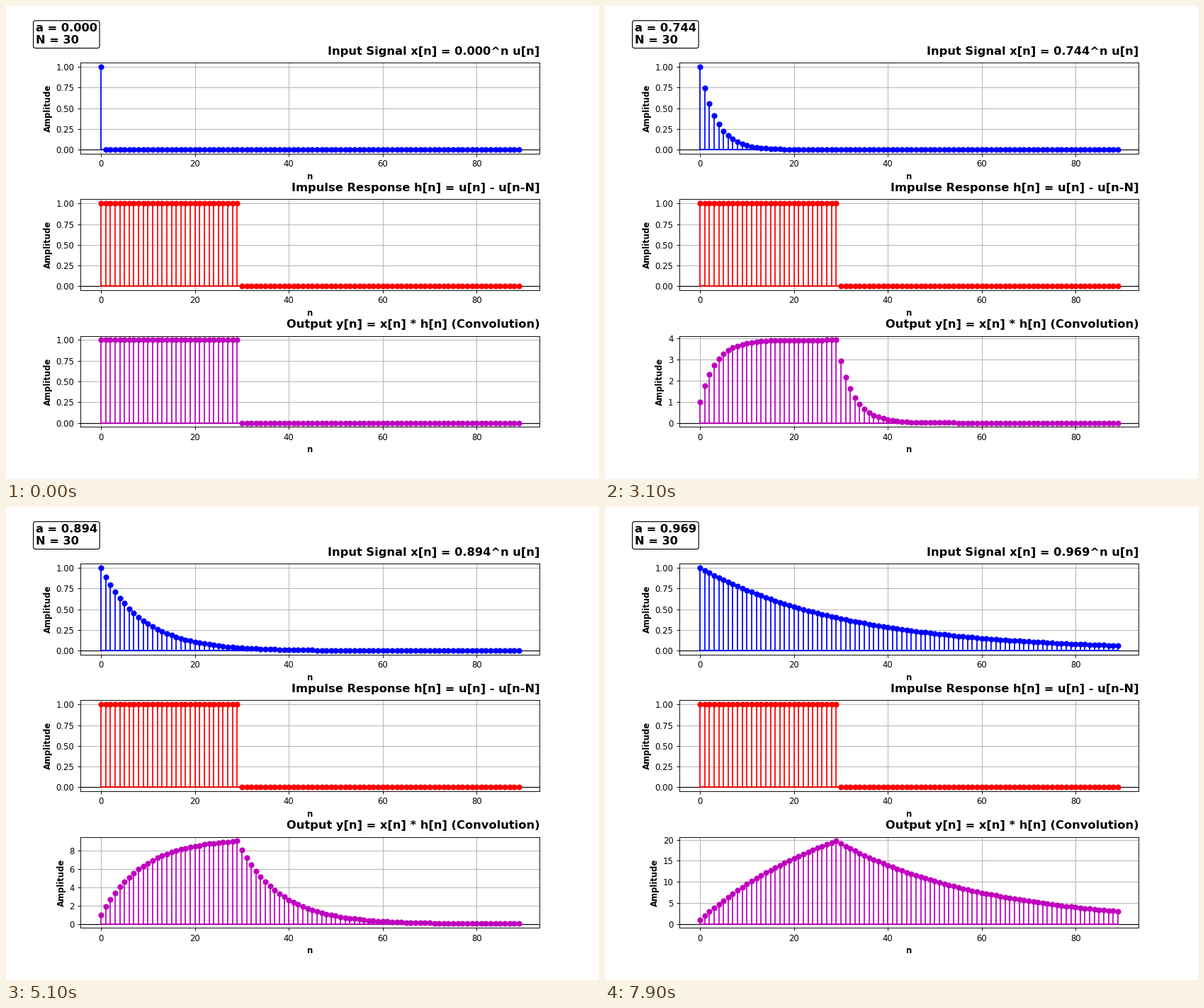
Recreate the animation shown at these times as a matplotlib script. Size 837 px wide and 669 px high, loop 8 s.

```python
import numpy as np
import matplotlib.pyplot as plt
from matplotlib.animation import FuncAnimation

DPI = 83.7
WIDTH, HEIGHT = 837, 669
FRAMES, INTERVAL = 80, 100
COUNT, N = 90, 30
DECAY = np.log(50) / (COUNT - 1)  # a reaches 0.98 after COUNT steps

n = np.arange(COUNT)
h = np.where(n < N, 1.0, 0.0)

# The small margin keeps the pixel size from rounding down.
fig, axes = plt.subplots(
    3, 1, figsize=((WIDTH + 0.01) / DPI, (HEIGHT + 0.01) / DPI), dpi=DPI)
fig.subplots_adjust(left=0.125, right=0.9, bottom=0.11, top=0.88, hspace=0.5)


def set_title(ax, text):
    ax.set_title(text, loc="right", fontsize=14, fontweight="bold", pad=10)


def make_stem(ax, color, title):
    ax.axhline(0, color="black", linewidth=1)
    stem = ax.stem(n, h, linefmt=color + "-", markerfmt=color + "o",
                   basefmt=color + "-")
    set_title(ax, title)
    ax.set_xlabel("n", fontweight="bold")
    ax.set_ylabel("Amplitude", fontweight="bold")
    ax.set_xlim(-0.05 * (COUNT - 1), 1.05 * (COUNT - 1))
    ax.set_ylim(-0.05, 1.05)
    ax.grid(True)
    return stem


def set_stem(ax, stem, values):
    stem.markerline.set_ydata(values)
    stem.stemlines.set_segments([[(x, 0), (x, y)] for x, y in zip(n, values)])
    top = values.max()
    ax.set_ylim(-0.05 * top, 1.05 * top)


ax_in, ax_imp, ax_out = axes
stem_in = make_stem(ax_in, "b", "")
make_stem(ax_imp, "r", "Impulse Response h[n] = u[n] - u[n-N]")
stem_out = make_stem(ax_out, "m", "Output y[n] = x[n] * h[n] (Convolution)")

info = fig.text(0.05, 0.94, "", fontsize=14, fontweight="bold",
                ha="left", va="center",
                bbox=dict(boxstyle="round,pad=0.2", facecolor="white",
                          edgecolor="black"))


def update(i):
    a = 1 - np.exp(-DECAY * i)
    x = a ** n
    set_stem(ax_in, stem_in, x)
    set_stem(ax_out, stem_out, np.convolve(x, h)[:COUNT])
    set_title(ax_in, f"Input Signal x[n] = {a:.3f}^n u[n]")
    info.set_text(f"a = {a:.3f}\nN = {N}")
    return []


anim = FuncAnimation(fig, update, frames=FRAMES, interval=INTERVAL,
                     repeat=True, repeat_delay=0, blit=False)
plt.show()
```
